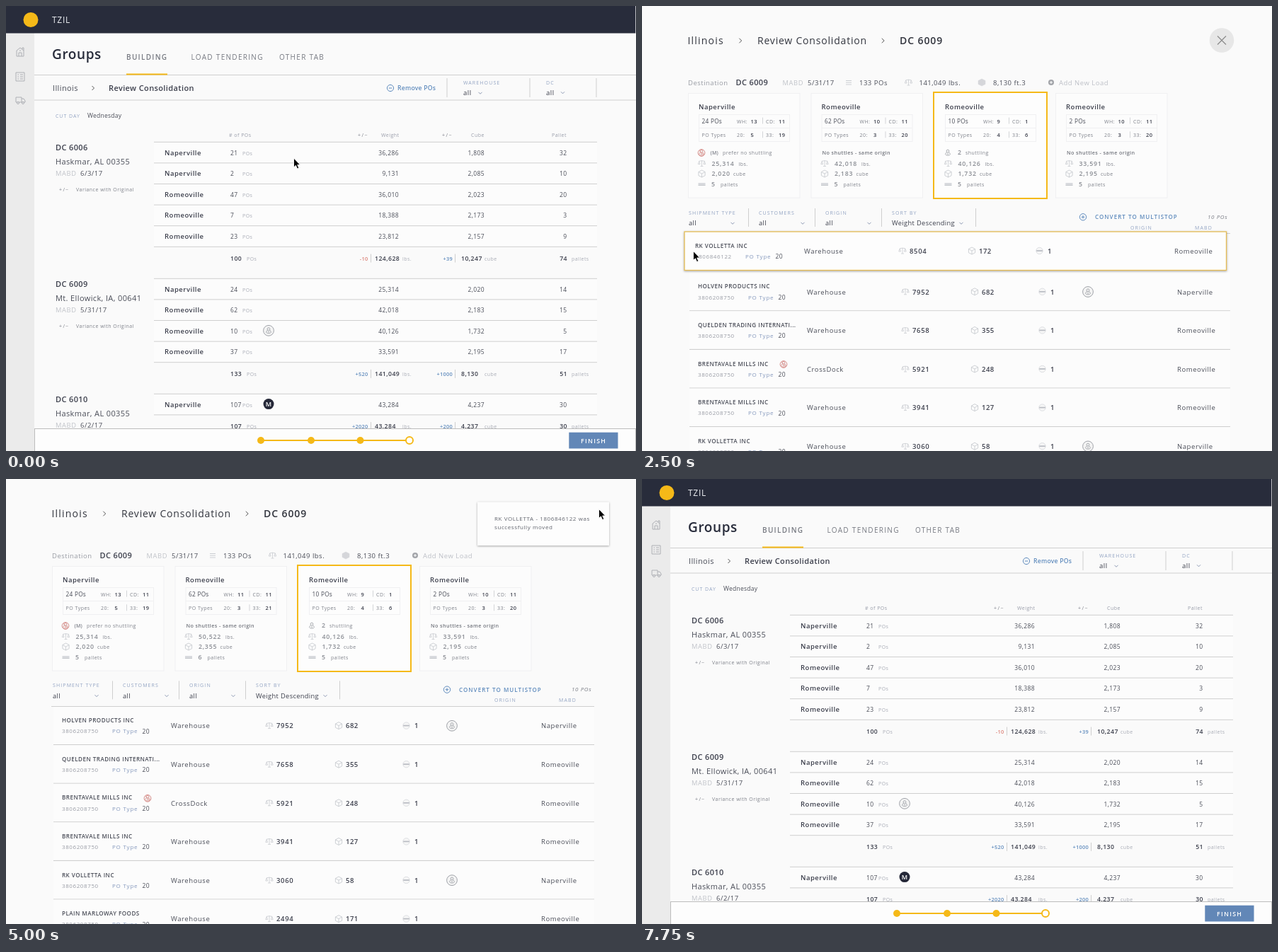
These frames come from a looping animation (890x629 px, 8.25 s). An HTML page:

```html
<!DOCTYPE html>
<html lang="en">
<head>
<meta charset="utf-8">
<title>Review Consolidation</title>
<style>
html, body { margin: 0; width: 100%; height: 100%; overflow: hidden; background: #fafafa; }
svg { display: block; width: 100vw; height: 100vh; }
text { font-family: "Open Sans", "Noto Sans", sans-serif; fill: #4a4d58; white-space: pre; }
.b { font-weight: 600; fill: #3c3f4c; }
.h1 { font-size: 19px; letter-spacing: .6px; fill: #282c3b; }
.tab { font-size: 10px; letter-spacing: 1.3px; fill: #777a82; }
.crumb { font-size: 11px; letter-spacing: .38px; }
.big { font-size: 14px; letter-spacing: .9px; fill: #33363f; }
.name { font-size: 9.5px; letter-spacing: .5px; }
.num { font-size: 8.5px; letter-spacing: .38px; }
.sum { font-size: 8.7px; letter-spacing: .45px; }
.amt { font-size: 8.8px; letter-spacing: .75px; fill: #8a8d94; font-weight: 600; }
.note { font-size: 7px; letter-spacing: .48px; fill: #7f828b; }
.pale { font-size: 7px; letter-spacing: .45px; fill: #a9acb6; }
.cap { font-size: 7px; letter-spacing: 1.12px; fill: #93a4c3; }
.diff { font-size: 7.4px; letter-spacing: .3px; font-weight: 600; fill: #5f8bbd; }
.firm { font-size: 8.1px; letter-spacing: .45px; font-weight: 600; fill: #4a4d58; }
.id { font-size: 8px; letter-spacing: .6px; fill: #989ba4; }
.type { font-size: 8px; letter-spacing: .8px; fill: #8498bc; }
.mabd { font-size: 9.3px; letter-spacing: .65px; fill: #c0c3c9; }
.end { text-anchor: end; }
.mid { text-anchor: middle; }
</style>
</head>
<body>
<svg id="stage" viewBox="0 0 890 629" preserveAspectRatio="none"></svg>
<script>
const YELLOW = '#f5b918', GOLD = '#e6bd55', BLUE = '#5f8bbd', GREY = '#c6c9ce', RED = '#d98f8b', RULE = '#cfcfcf';

const text = (x, y, s, cls, style = '') => `<text x="${x}" y="${y}" class="${cls}" style="${style}">${s}</text>`;
const rect = (x, y, w, h, fill, more = '') => `<rect x="${x}" y="${y}" width="${w}" height="${h}" fill="${fill}" ${more}/>`;
const path = (d, stroke, width = 1, fill = 'none') => `<path d="${d}" fill="${fill}" stroke="${stroke}" stroke-width="${width}"/>`;
const disc = (x, y, r, fill, stroke = 'none', width = 1) =>
  `<circle cx="${x}" cy="${y}" r="${r}" fill="${fill}" stroke="${stroke}" stroke-width="${width}"/>`;
const at = (x, y, s) => `<g transform="translate(${x} ${y})">${s}</g>`;
const hline = (x, y, x2, color = RULE) => path(`M${x} ${y}H${x2}`, color);
const vline = (x, y, y2, color = RULE) => path(`M${x} ${y}V${y2}`, color);
const right = (x, y, color = '#555', s = 1) => path(`M${x - 1.5 * s} ${y - 3 * s}l${3 * s} ${3 * s}l${-3 * s} ${3 * s}`, color);
const down = (x, y) => path(`M${x - 2.5} ${y - 1.2}l2.5 2.5l2.5 -2.5`, '#8d99b3');

const scale = (x, y) => at(x, y, path('M0-4V4M-2 4H2M-4-3.2Q0-4.5 4-3.2M-5.2 1L-3.8-3L-2.4 1ZM5.2 1L3.8-3L2.4 1Z', GREY, .75));
const cube = (x, y) => at(x, y, path('M0-5L4.6-2.5V2.7L0 5L-4.6 2.7V-2.5ZM-4.6-2.5L0 0L4.6-2.5M0 0V5', GREY, .85));
const pallet = (x, y) => at(x, y, rect(-5, -2, 10, 3.4, '#d8dade') + path('M-5 1.5H5', '#bcbfc5', .8));
const pallets = (x, y) => at(x, y, disc(0, 0, 4.7, '#f6f6f6', '#d6d8dc', .8) + path('M-4.3 0H4.3', '#b9bcc3', 1.7));
const pawn = (x, y, c = '#a0a3a9') => at(x, y, disc(0, -2.2, 1.9, 'none', c, .9) + path('M-1.5-.8L-3.6 2.2Q-3 3.8 0 3.8T3.6 2.2L1.5-.8M-1 1.7H1', c, .9));
const shuttle = (x, y, r = 7.4, c = '#a0a3a9') => at(x, y, disc(0, 0, r, '#f4f4f4', c) + pawn(0, 0, c));
const noShuttle = (x, y) => shuttle(x, y, 4.9, RED) + path(`M${x - 3.4} ${y - 3.4}l6.8 6.8`, RED, .8);

const shadow = 'filter="drop-shadow(0 1.5px 1.5px #0005)"';

const groups = [
  { y: 192.3, dc: 6006, city: 'Haskmar, AL 00355', day: '6/3/17', total: [100, '-10', '124,628', '+39', '10,247', 74],
    rows: ['N 21 36,286 1,808 32', 'N 2 9,131 2,085 10', 'R 47 36,010 2,023 20', 'R 7 18,388 2,173 3', 'R 23 23,812 2,157 9'] },
  { y: 385.3, dc: 6009, city: 'Mt. Ellowick, IA, 00641', day: '5/31/17', total: [133, '+520', '141,049', '+1000', '8,130', 51],
    rows: ['N 24 25,314 2,020 14', 'R 62 42,018 2,183 15', 'R 10 40,126 1,732 5', 'R 37 33,591 2,195 17'] },
  { y: 548.3, dc: 6010, city: 'Haskmar, AL 00355', day: '6/2/17', total: [107, '+2020', '43,284', '+200', '4,237', 30],
    rows: ['N 107 43,284 4,237 30'] }
];
const towns = { N: 'Naperville', R: 'Romeoville' };

function group(g, hover) {
  const fix = s => hover ? s.replace('43,284', '41,284') : s;
  const { y } = g, n = g.rows.length, [pos, dw, weight, dc, vol, pal] = g.total;
  let s = text(70, y + 11.6, 'DC ' + g.dc, 'crumb b') + text(70, y + 31.2, g.city, 'crumb')
    + text(70, y + 47.7, 'MABD', 'mabd') + text(105, y + 47.7, g.day, 'name')
    + text(75, y + 69.6, '+/−', 'note', 'letter-spacing:1.4px') + text(99, y + 69.6, 'Variance with Original', 'note')
    + rect(209, y, 626, n * 29.6, '#fcfcfc') + hline(209, y, 835);
  g.rows.forEach((row, i) => {
    const [town, count, w, c, p] = row.split(' '), b = y + 18.3 + i * 29.6, lit = hover && count == 10;
    s += `<g opacity="${lit ? .6 : 1}">` + text(224, b, towns[town], 'name b') + text(317, b, count, 'num')
      + text(334, b, 'POs', 'pale') + text(555, b, fix(w), 'num end') + text(676, b, c, 'num end') + text(792.5, b, p, 'num end') + '</g>'
      + hline(209, y + (i + 1) * 29.6, 835);
    if (count == 10) s += shuttle(371, b - 4);
    if (lit) s += right(816, b - 4, BLUE);
    if (count == 107) s += disc(371, b - 4, 7.5, '#252838') + text(371, b - .6, 'M', 'b mid', 'font-size:9px;fill:#fff');
  });
  const b = y + 19.2 + n * 29.6;
  return s + text(317, b, pos, 'sum b') + text(340, b, 'POs', 'pale')
    + text(511.5, b, dw, 'diff end', dw < 0 ? 'fill:#dc8177' : '') + vline(515.5, b - 9, b + 3)
    + text(521, b, fix(weight), 'sum b') + text(560, b, 'lbs.', 'pale') + text(631, b, dc, 'diff end') + vline(634.5, b - 9, b + 3)
    + text(643, b, vol, 'sum b') + text(676, b, 'cube', 'pale') + text(793, b, pal, 'sum b end') + text(799, b, 'pallets', 'pale');
}

function overview(hover) {
  const icons = at(20, 65, path('M-5-2L0-6L5-2V6H-5ZM-2 6V1H2V6M3-4V-6H5V-2M-1-2H1', '#aeb0b5'))
    + at(20, 100, path('M-6-6H6V6H-6ZM-3.5-3H-2M0-3H4M-3.5 0H-2M0 0H4M-3.5 3H-2M0 3H4', '#aeb0b5'))
    + at(20, 133, path('M-6-4H2V3H-6ZM2-2H5L7 1V3H2', '#aeb0b5') + disc(-3, 4, 1.5, '#ebebeb', '#aeb0b5') + disc(4, 4, 1.5, '#ebebeb', '#aeb0b5'));
  const heads = [[315, '# of POs'], [530, 'Weight'], [657, 'Cube'], [771, 'Pallet']].map(([x, s]) => text(x, 185, s, 'note', 'fill:#999daa')).join('');
  const plain = 'font-weight:400';
  return rect(0, 0, 890, 629, '#fafafa') + rect(0, 38, 40, 591, '#ebebeb') + rect(0, 0, 889.3, 38.5, '#282c3b')
    + disc(35, 19.5, 10.5, YELLOW) + text(65, 24, 'TZIL', '', 'font-size:12px;letter-spacing:.7px;fill:#eceef2') + icons
    + text(65, 75, 'Groups', 'h1 b') + text(170, 76, 'BUILDING', 'tab b') + text(261.5, 76, 'LOAD TENDERING', 'tab') + text(386, 76, 'OTHER TAB', 'tab')
    + hline(40, 97.5, 890) + rect(170, 95.5, 58, 2, YELLOW) + hline(40, 133, 890)
    + text(66, 119.5, 'Illinois', 'crumb') + right(123, 116) + text(145, 119.5, 'Review Consolidation', 'crumb b')
    + disc(543, 116, 4.6, 'none', BLUE) + path('M540.7 116H545.3', BLUE)
    + text(553, 119, 'Remove POs', 'b', `font-size:8.6px;letter-spacing:.25px;fill:${BLUE}`)
    + [623, 740, 834].map(x => vline(x, 102, 129)).join('')
    + text(646, 110.7, 'WAREHOUSE', 'cap') + text(763, 110.7, 'DC', 'cap') + text(646, 126, 'all', 'name b', plain)
    + text(763, 125.5, 'all', 'name b', plain) + down(670, 123) + down(786.5, 122.5)
    + text(70, 158, 'CUT DAY', 'cap', 'letter-spacing:.95px') + text(115, 158, 'Wednesday', 'num', 'letter-spacing:.25px')
    + heads + text(497, 185, '+/−', 'note', 'letter-spacing:1.6px') + text(616, 185, '+/−', 'note', 'letter-spacing:1.6px')
    + groups.map(g => group(g, hover)).join('')
    + rect(40.5, 597.5, 849, 32, '#fdfdfd', 'stroke="#bdbdbd"') + path('M360 614H565', YELLOW, 2)
    + [360, 431, 500.5].map(x => disc(x, 614, 5, YELLOW)).join('') + disc(570, 614, 5, '#fff', YELLOW, 2)
    + rect(795.3, 602.7, 69.2, 22.8, '#6287b7') + text(812, 617.5, 'FINISH', 'b', 'font-size:8.8px;letter-spacing:1.3px;fill:#fff');
}

function card(x, town, pos, [wh, cd, a, b], kg, vol, pal, kind, mark) {
  const frame = mark == 'picked' ? rect(x - 16, 122, 160, 150, '#fdfdfd', `stroke="${YELLOW}" stroke-width="2"`)
    : mark == 'target' ? rect(x - 15, 122.5, 159, 148.5, '#fdfdfd', `stroke="${GOLD}" stroke-width="1.5" ${shadow}`)
    : rect(x - 14.5, 123.5, 157.5, 147.5, '#fcfcfc', 'stroke="#f0f0f2"');
  const pair = (y, k1, v1, k2, v2) => text(x + 54, y, k1, 'note') + text(x + 73.5, y, v1, 'num b', 'font-size:7.5px')
    + vline(x + 90.5, y - 8, y + 1, '#d4d5d8') + text(x + 95, y, k2, 'note') + text(x + 113, y, v2, 'num b', 'font-size:7.5px');
  const first = kind == 'avoid' ? noShuttle(x + 4, 207.5) + text(x + 16.5, 210, '(M)', 'note b', 'letter-spacing:.2px') + text(x + 34, 210, 'prefer no shuttling', 'note')
    : kind == 'some' ? pawn(x + 4, 207.3) + text(x + 18, 210, 2, 'amt') + text(x + 29, 210, 'shuttling', 'note')
    : text(x + 1, 210, 'No shuttles - same origin', 'note b', 'font-size:7.2px;letter-spacing:.4px;fill:#72757d');
  return frame + text(x, 146.3, town, 'name b') + rect(x + .5, 153.5, 128, 38, 'none', 'stroke="#f0f0f2"') + hline(x, 172.5, x + 128, '#f0f0f2')
    + text(x + 4.5, 165.6, `${pos} POs`, 'num', 'font-size:8.3px;letter-spacing:.25px') + pair(165.6, 'WH:', wh, 'CD:', cd)
    + text(x + 4.5, 185.3, 'PO Types', 'note') + pair(185.3, '20:', a, '33:', b) + first
    + scale(x + 4.5, 222.5) + text(x + 18.5, 226, kg, 'amt') + text(x + 56.5, 226, 'lbs.', 'note')
    + cube(x + 4.5, 237) + text(x + 18.5, 240.3, vol, 'amt') + text(x + 49, 240.3, 'cube', 'note')
    + pallet(x + 4.5, 252) + text(x + 18, 255, pal, 'amt') + text(x + 31, 255, 'pallets', 'note');
}

const N = 'Naperville', R = 'Romeoville', W = 'Warehouse';
const loads = [
  ['RK VOLLETTA INC', W, 8504, 172, R], ['HOLVEN PRODUCTS INC', W, 7952, 682, N, 1], ['QUELDEN TRADING INTERNATI...', W, 7658, 355, R],
  ['BRENTAVALE MILLS INC', 'CrossDock', 5921, 248, R, 0, 1], ['BRENTAVALE MILLS INC', W, 3941, 127, R],
  ['RK VOLLETTA INC', W, 3060, 58, N, 1], ['PLAIN MARLOWAY FOODS', W, 2494, 171, R]
];

// One load line; its origin is the top of the line.
function load(i, held) {
  const [firm, place, kg, vol, town, ring, avoid] = loads[i];
  return (held ? rect(64, .5, 765.5, 54.5, '#fdfdfd', `stroke="${GOLD}" stroke-width="1.3" ${shadow}`)
      : rect(67, .5, 764, 54, '#fcfcfc') + hline(67, 54.5, 831, '#cbcbcb'))
    + text(79, 23.2, firm, 'firm') + (avoid ? noShuttle(200, 21) : '')
    + text(79, 38.3, i ? 3806208750 : 1806846122, 'id') + text(150, 38.3, 'PO Type', 'type') + text(192.5, 38.5, 20, 'num')
    + text(233, 31.3, place, 'name', 'letter-spacing:.58px') + scale(372, 27.5) + text(382, 31.4, kg, 'name b', 'letter-spacing:.7px')
    + cube(470, 27.5) + text(480, 31.4, vol, 'name b') + pallets(565.5, 27.5) + text(577, 31.4, 1, 'name b')
    + (ring ? shuttle(630, 27.7) : '') + text(756, 31.3, town, 'name', 'letter-spacing:.58px');
}

function detail(t) {
  const moved = t >= 5000, aimed = t >= 3250 && !moved;
  const held = t >= 2500 && !moved, toast = moved && t < 6500;
  const name = (x, s, style) => text(x, 112, s, 'name', style);
  let s = rect(0, 0, 890, 629, '#fafafa')
    + text(64.5, 54, 'Illinois', 'big', 'letter-spacing:1.2px') + right(139, 49, '#555', 1.1) + text(163, 54, 'Review Consolidation', 'big', 'letter-spacing:.8px')
    + right(340.5, 49, '#555', 1.1) + text(364, 54, 'DC 6009', 'big b')
    + name(65, 'Destination', 'fill:#989ba3') + text(132.5, 112, 'DC 6009', 'crumb b') + text(198.5, 112, 'MABD', 'mabd') + name(234, '5/31/17')
    + path('M288 105.5H296M288 108.2H296M288 111H296', GREY, .9) + name(307, '133 POs') + scale(376.5, 108) + name(391.5, '141,049 lbs.')
    + path('M480 103L485 105.5V110.5L480 113L475 110.5V105.5Z', '#d5d6da', .5, '#d5d6da') + name(496, '8,130 ft.3')
    + disc(578, 108, 4, '#a3a5aa') + path('M576 108H580M578 106V110', '#fff') + name(589, 'Add New Load', 'fill:#bdc0c7')
    + card(80, N, 24, [13, 11, 5, 19], '25,314', '2,020', 5, 'avoid')
    + card(253.5, R, 62, moved ? [11, 11, 3, 21] : [10, 11, 3, 20], moved ? '50,522' : '42,018', moved ? '2,355' : '2,183', moved ? 6 : 5, '', aimed && 'target')
    + card(428, R, 10, [9, 1, 4, 6], '40,126', '1,732', 5, 'some', 'picked')
    + card(599, R, 2, [10, 11, 3, 20], '33,591', '2,195', 5);
  const filters = [[66, 'SHIPMENT TYPE', 128, 150], [165, 'CUSTOMERS', 227, 244], [259, 'ORIGIN', 321, 338], [353, 'SORT BY', 451, 471]]
    .map(([x, label, arrow, bar], i) => text(x, 294.8, label, 'cap') + text(x, 310.3, i < 3 ? 'all' : 'Weight Descending', 'name b', 'font-weight:400;font-size:9.3px;letter-spacing:.35px')
      + down(arrow, 307) + vline(bar + .5, 286, 312)).join('');
  s += at(0, moved ? -.6 : 0, filters + disc(623, 298.3, 4.7, 'none', BLUE) + path('M620.7 298.3H625.3M623 296V300.6', BLUE)
    + text(640, 301.2, 'CONVERT TO MULTISTOP', 'b', `font-size:8px;letter-spacing:1.05px;fill:${BLUE}`)
    + text(799, 301, t < 6500 ? '10 POs' : '9 POs', 'id', 'font-style:italic;fill:#7c7f87')
    + text(690, 315.5, 'ORIGIN', 'cap') + text(781, 315.5, 'MABD', 'cap'));
  for (let i = held || moved ? 1 : 0; i < loads.length; i++) s += at(0, 321.7 + 54.6 * (i - moved) - .6 * moved, load(i));
  s += hline(64, 321.5, 831);
  if (held) s += aimed ? at(-44, 211.5, load(0, true)) : at(-4, 318.5, load(0, true));
  return s + (toast
    ? rect(666, 32.5, 186, 61.5, '#fdfdfd', shadow)
      + text(690, 59.3, 'RK VOLLETTA - 1806846122 was', 'id', 'fill:#62656e') + text(690, 71.3, 'successfully moved', 'id', 'fill:#62656e')
    : disc(819, 48.5, 17.3, '#e7e7e7') + path('M813 42.5l12 12m0-12l-12 12', '#8d8d8d', 1.3));
}

// Pointer stops: time, x, y; no place means hidden.
const stops = [[0, 406, 214.5], [250, 405, 305], [500, 378.5, 474.5], [750, 379, 474.5], [2000, 9, 366], [2250, 72, 346], [3250, 135.5, 344],
  [3750, 652, 278], [4000], [4250, 885, 19], [4500, 877, 22], [5000, 837, 42], [5250, 828, 46], [5500, 823, 49], [5750, 812, 50], [6250, 812, 51], [7250]];

function pointer(t) {
  const [, x, y] = stops.filter(p => p[0] <= t).pop();
  return x === undefined ? '' : at(x, y, path('M.5.5V13.5L3.4 10.8L5.5 15.6L7.8 14.6L5.7 10H9.6Z', '#fff', .9, '#000'));
}

function scene(t) {
  if (t < 2000) return overview(t >= 1250);
  if (t < 7500) return detail(t);
  return t < 7750 ? detail(t) + `<g opacity=".5">${overview()}</g>` : overview();
}

const stage = document.getElementById('stage'), start = performance.now();
let shown = -1;
function draw() {
  const t = Math.floor((performance.now() - start) % 8250 / 250) * 250;
  if (t !== shown) stage.innerHTML = scene(t) + pointer(t);
  shown = t;
  requestAnimationFrame(draw);
}
draw();
</script>
</body>
</html>
```
